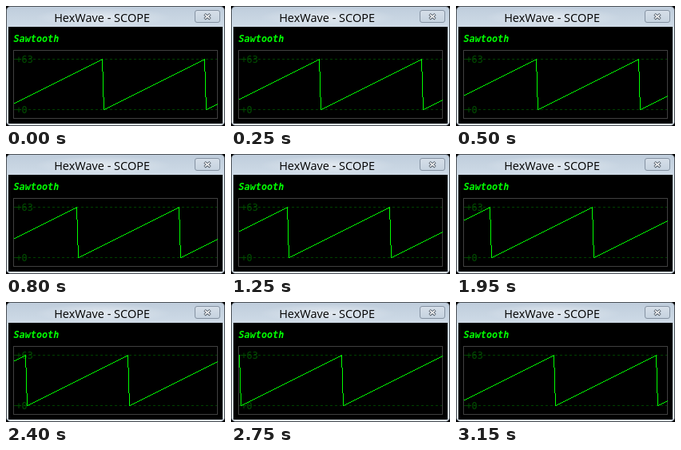
Write an HTML page that moves like this. It is 274x150 px and loops after 3200 ms.

```html
<!DOCTYPE html>
<html lang="en">
<head>
<meta charset="utf-8">
<title>Scope</title>
<style>
html, body { margin: 0; width: 100%; height: 100%; overflow: hidden; background: #000; }
svg { display: block; width: 100vw; height: 100vh; }
.title { font: 14.5px "Open Sans", "Noto Sans", sans-serif; fill: #000; }
.mono { font: 11.8px "DejaVu Sans Mono", monospace; fill: #005000; }
.name { font-weight: bold; font-style: italic; fill: #0f0; }
.crisp { shape-rendering: crispEdges; }
</style>
</head>
<body>
<svg viewBox="0 0 274 150">
  <defs>
    <linearGradient id="bar" x2="0" y2="1">
      <stop offset="0" stop-color="#bfcddc"/>
      <stop offset=".18" stop-color="#cfdbe7"/>
      <stop offset="1" stop-color="#dce5ee"/>
    </linearGradient>
    <radialGradient id="glow">
      <stop offset="0" stop-color="#fff" stop-opacity=".5"/>
      <stop offset="1" stop-color="#fff" stop-opacity="0"/>
    </radialGradient>
    <linearGradient id="button" x2="0" y2="1">
      <stop offset="0" stop-color="#d6dfe9"/>
      <stop offset="1" stop-color="#c5d2df"/>
    </linearGradient>
    <clipPath id="plot"><rect x="10" y="56" width="255" height="84"/></clipPath>
  </defs>

  <!-- Window -->
  <rect x=".5" y=".5" width="273" height="149" rx="5" fill="url(#bar)" stroke="#4c5157"/>
  <ellipse cx="121" cy="14" rx="85" ry="12" fill="url(#glow)"/>
  <text class="title" x="180" y="20" text-anchor="end">HexWave - SCOPE</text>
  <rect x="236.5" y="5.5" width="31" height="15" rx="2.5" fill="url(#button)" stroke="#8592a2"/>
  <path d="M248.5 10.2l7 6m0-6l-7 6" stroke="#505a66" stroke-width="3.4"/>
  <path d="M248.9 10.6l6.2 5.2m0-5.2l-6.2 5.2" stroke="#fff" stroke-width="1.5"/>
  <rect x="3" y="26" width="268" height="121"/>

  <!-- Scope -->
  <text class="mono name" x="9.5" y="45">Sawtooth</text>
  <rect class="crisp" x="9.5" y="55.5" width="255" height="85" fill="none" stroke="#404040"/>
  <path class="crisp" d="M10 66.5H264M10 129.5H264" stroke="#004000" stroke-dasharray="3 3"/>
  <text class="mono" x="12.5" y="71">+63</text>
  <text class="mono" x="12.5" y="133.5">+0</text>
  <g clip-path="url(#plot)"><path id="wave" class="crisp" fill="#0f0"/></g>
</svg>
<script>
const PERIOD = 128, STEP_MS = 50, STEPS = 64, PEAK_X = 120, TOP = 66, MAX = 63;
const wave = document.getElementById("wave");
const box = (x, y, w, h) => `M${x} ${y}h${w}v${h}h${-w}z`;

// One tooth ending at peak x: a staircase up, then a three-column drop.
function tooth(x) {
  let d = "";
  for (let i = 1; i <= MAX; i++) d += box(x - 2 * i, TOP + i, 2, 1);
  return d + box(x, TOP, 1, 16) + box(x + 1, TOP + 16, 1, 32) + box(x + 2, TOP + 48, 1, 16);
}

wave.setAttribute("d", [-1, 0, 1, 2, 3].map(n => tooth(PEAK_X + n * PERIOD)).join(""));

function draw() {
  const step = Math.floor(performance.now() / STEP_MS) % STEPS;
  wave.setAttribute("transform", `translate(${-2 * step})`);
  requestAnimationFrame(draw);
}
draw();
</script>
</body>
</html>
```
